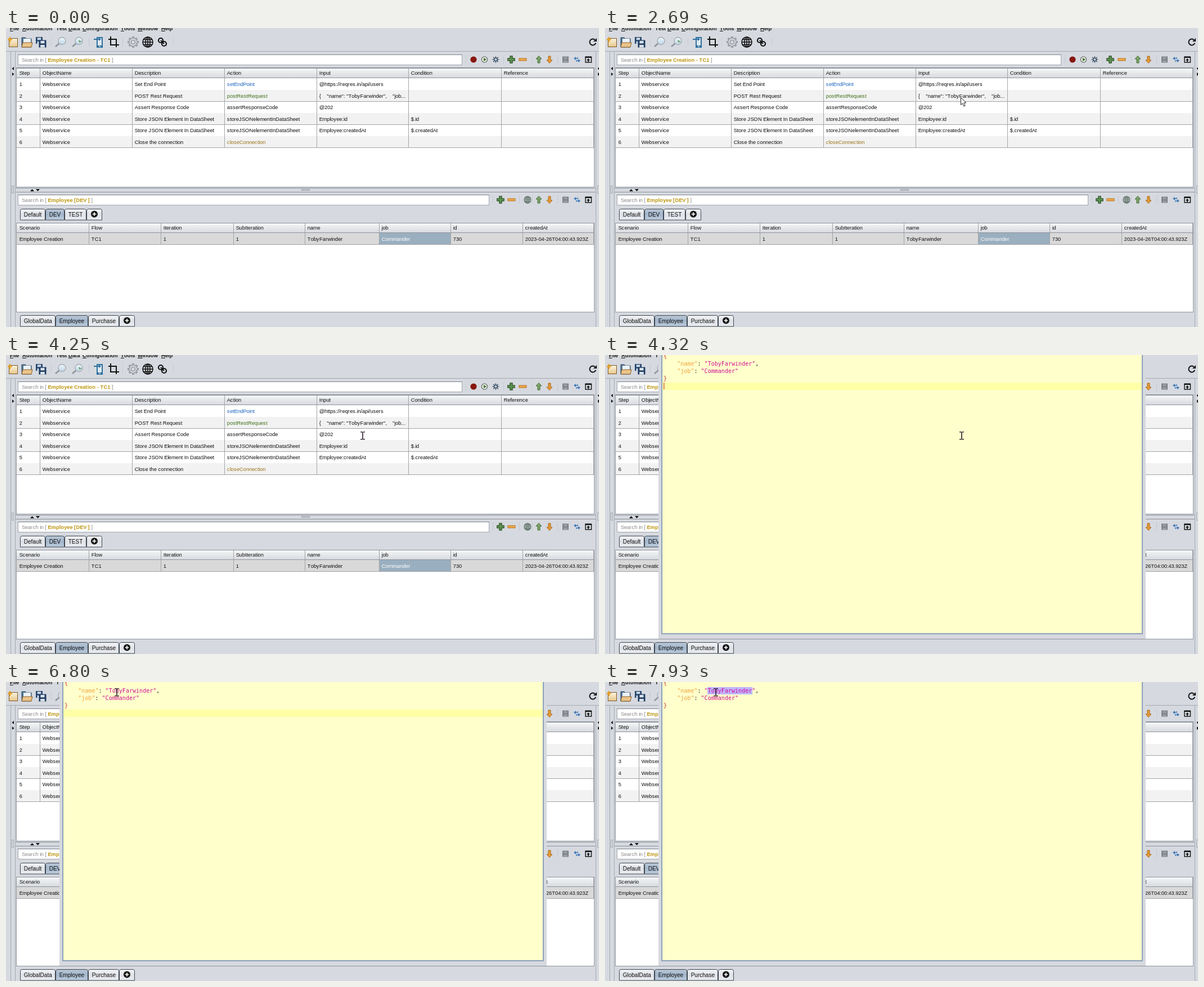
Recreate the animation shown at these times as an HTML page with a canvas. Size 1054 by 531 pixels, loop 8000 ms.

```html
<!DOCTYPE html>
<html lang="en">
<head>
<meta charset="utf-8">
<title>Test automation workspace</title>
<style>
html, body { margin: 0; width: 100%; height: 100%; overflow: hidden; background: #d6d9df; }
canvas { display: block; }
</style>
</head>
<body>
<canvas id="stage" width="1054" height="531"></canvas>
<script>
const g = document.getElementById('stage').getContext('2d');
const SANS = '"Liberation Sans", Arial, sans-serif';
const BODY = `9.3px ${SANS}`, BOLD = `bold 9.3px ${SANS}`, TAB = `10px ${SANS}`;
const MONO = '10.05px "DejaVu Sans Mono", monospace';
const LOOP = 8000, STEP = 67.3, ZOOM = .846;
const PANEL = '#d6d9df', GRID = '#a2a4a8', EDGE = '#8f949c', RIM = '#a4a9b2', GREEN = '#3f7032', ORANGE = '#e59a35';
const PERSON = 'TobyFarwinder';

// ---- drawing helpers ----
function rect(x, y, w, h, fill) { g.fillStyle = fill; g.fillRect(x, y, w, h); }
function frame(x, y, w, h, color) {
  g.strokeStyle = color; g.lineWidth = 1; g.strokeRect(x + .5, y + .5, w - 1, h - 1);
}
function fade(y, h, ...colors) {
  const f = g.createLinearGradient(0, y, 0, y + h);
  colors.forEach((c, i) => f.addColorStop(i / (colors.length - 1), c));
  return f;
}
// Small UI type sits on whole pixels of an 11px grid, shown at ZOOM
const advances = {};
function advance(ch, font) {
  const key = ch + font;
  if (!(key in advances)) {
    g.font = font.replace('9.3px', '111px');
    advances[key] = Math.round(g.measureText(ch).width / 10) * ZOOM;
  }
  return advances[key];
}
function width(s, font) { return [...s].reduce((sum, ch) => sum + advance(ch, font), 0); }
// y is the middle of the capitals; returns the x after the text
function text(s, x, y, color = '#111', font = BODY) {
  s = String(s);
  for (const ch of s) {
    const w = advance(ch, font);
    g.font = font; g.fillStyle = color;
    g.fillText(ch, x, y + 3.3);
    x += w;
  }
  return x;
}
function plainText(s, x, baseline, color, font) {
  g.font = font; g.fillStyle = color;
  g.fillText(s, x, baseline);
  return x + g.measureText(s).width;
}
function poly(points, fill, stroke, weight = 1) {
  g.beginPath();
  points.forEach(([x, y]) => g.lineTo(x, y));
  g.closePath();
  if (fill) { g.fillStyle = fill; g.fill(); }
  if (stroke) { g.strokeStyle = stroke; g.lineWidth = weight; g.stroke(); }
}
function line(points, color, weight = 1) {
  g.beginPath();
  points.forEach(([x, y]) => g.lineTo(x, y));
  g.strokeStyle = color; g.lineWidth = weight; g.stroke();
}
function disc(x, y, r, fill) { g.beginPath(); g.arc(x, y, r, 0, 7); g.fillStyle = fill; g.fill(); }
function ring(x, y, r, color, weight, from = 0, to = 2 * Math.PI) {
  g.beginPath(); g.arc(x, y, r, from, to); g.strokeStyle = color; g.lineWidth = weight; g.stroke();
}
function spokes(x, y, n, r0, r1, color, weight) {
  for (let i = 0; i < n; i++) {
    const a = i * 2 * Math.PI / n, c = Math.cos(a), s = Math.sin(a);
    line([[x + c * r0, y + s * r0], [x + c * r1, y + s * r1]], color, weight);
  }
}

// ---- icons, all given by their centre ----
function floppy(x, y, s, color, label) {
  rect(x - s, y - s, 2 * s, 2 * s, color);
  rect(x - s * .55, y - s * .8, s * 1.1, s * .7, label);
  rect(x - s * .6, y + s * .3, s * 1.2, s * .7, label);
}
function globe(x, y, r, color, weight) {
  ring(x, y, r, color, weight);
  g.beginPath(); g.ellipse(x, y, r * .45, r, 0, 0, 7); g.stroke();
  for (const d of [-.5, 0, .5]) {
    const w = r * Math.sqrt(1 - d * d);
    line([[x - w, y + d * r], [x + w, y + d * r]], color, weight);
  }
  line([[x, y - r], [x, y + r]], color, weight);
}
function plus(x, y) {
  for (const [r, w, color] of [[6.8, 5.4, '#27481f'], [5.8, 3.2, '#5b9150']]) {
    line([[x - r, y], [x + r, y]], color, w); line([[x, y - r], [x, y + r]], color, w);
  }
}
function minus(x, y) { rect(x - 7, y - 2.5, 14, 5, '#b8701c'); rect(x - 6, y - 1.5, 12, 3, '#f0aa4a'); }
function arrow(x, y, d, fill, edge) {
  poly([[0, -6.5], [5, -1], [2, -1], [2, 6], [-2, 6], [-2, -1], [-5, -1]].map(([a, b]) => [x + a, y + b * d]), fill, edge);
}
function swap(x, y) {
  const c = '#3f78b8';
  poly([[x - 6, y - 2], [x - 2, y - 5], [x - 2, y + 1]], c);
  poly([[x + 6, y + 2], [x + 2, y - 1], [x + 2, y + 5]], c);
  line([[x - 2, y - 2], [x + 1, y - 2], [x + 1, y - 4]], c, 1.4);
  line([[x + 2, y + 2], [x - 1, y + 2], [x - 1, y + 4]], c, 1.4);
}
function popOut(x, y) {
  g.strokeStyle = '#111'; g.lineWidth = 1.4; g.strokeRect(x - 5, y - 4.5, 10.5, 9.5);
  rect(x - 5.5, y - 5.5, 11, 2.5, '#111');
  poly([[x, y - 2], [x + 3, y + 1.5], [x - 3, y + 1.5]], '#111');
  rect(x - .8, y, 1.8, 4, '#111');
}
function lens(x, y, tint) {
  line([[x - 2, y + 2], [x - 9, y + 8]], '#8f959d', 2.6);
  disc(x + 2.5, y - 2, 6.5, fade(y - 9, 13, '#f3f8fb', '#bcd6e6')); ring(x + 2.5, y - 2, 6.5, '#a3a9b1', 1.3);
  if (tint) poly([[x + 2, y - 4], [x + 8, y - 1], [x + 3, y + 1]], tint);
}
function separators(y, ...xs) { for (const x of xs) for (let d = -7; d < 8; d += 3) rect(x, y + d, 1, 1, '#aab0b9'); }
function plusDisc(x, y) {
  disc(x, y, 6, '#111');
  line([[x - 3.3, y], [x + 3.3, y]], '#fff', 1.7); line([[x, y - 3.3], [x, y + 3.3]], '#fff', 1.7);
}

// ---- window parts ----
function menuAndTools() {
  [['File', 7], ['Automation', 29], ['Test Data', 89, 5], ['Configuration', 136], ['Tools', 204], ['Window', 234], ['Help', 276]]
    .forEach(([s, x, i = 0]) => {
      text(s, x, .8, '#111', BOLD);
      rect(x + width(s.slice(0, i), BOLD), 5, width(s[i], BOLD), 1, '#111');
    });
  separators(25, 80, 147, 207, 297);

  rect(5, 18, 16, 16, '#7d5a28'); rect(6, 19, 14, 14, fade(19, 14, '#fbf3df', '#e8c88c'));
  line([[3, 20.5], [11, 20.5]], '#e8a52c', 2.4); line([[7, 16], [7, 25]], '#e8a52c', 2.4);

  poly([[28, 34], [28, 17], [34, 17], [36, 19], [45, 19], [45, 34]], '#4f7594', '#2f4d63');
  rect(31, 19, 13, 8, '#edf3f7');
  poly([[28, 34], [30, 26], [47, 26], [45, 34]], '#ecc48a', '#8a6128');

  floppy(59, 22, 6, '#24456f', '#c9d6e2'); floppy(65, 28, 6.5, '#1d3a60', '#dbe4ec');
  lens(97, 25); lens(127, 25, '#76a874');

  rect(161, 16, 11, 19, '#2d6f9f'); rect(163, 18, 7, 13, '#dfe8ef');
  rect(165, 32, 3, 1.5, '#dfe8ef');
  line([[156, 20], [166, 20]], '#2d6f9f', 2); poly([[165, 17], [169, 20], [165, 23]], '#2d6f9f');

  line([[186, 15], [186, 30], [201, 30]], '#111', 2); line([[182, 20], [196, 20], [196, 34]], '#111', 2);

  spokes(226, 25, 8, 7, 9.8, '#85888c', 4);
  spokes(226, 25, 8, 6, 8.6, PANEL, 2);
  ring(226, 25, 7, '#85888c', 1.2); disc(226, 25, 6.4, PANEL); ring(226, 25, 3.5, '#85888c', 1.2);
  globe(252, 25, 9, '#111', 1.6);
  ring(275, 22, 4, '#111', 2.2); ring(281, 28, 4, '#111', 2.2); line([[275, 22], [281, 28]], '#111', 2);
  ring(1043, 25, 5.5, '#111', 1.9, .3, 5.5);
  poly([[1044, 24], [1050, 24], [1050, 18]], '#111');
}

function searchBar(y, w, label) {
  rect(21, y, w, 19, '#fff'); frame(21, y, w, 19, '#a4a8af');
  rect(21, y, w, 1, '#7f848c');
  let x = text('Search in [ ', 28, y + 10, '#8a8a8a');
  x = text(label, x, y + 10, '#bb960f', BOLD);
  text(' ]', x, y + 10, '#8a8a8a');
}

function sharedIcons(y) {
  separators(y, 935, 980);
  arrow(947, y, 1, '#7fa169', GREEN); arrow(966, y, -1, ORANGE, '#a9681b');
  floppy(994.5, y, 5.5, '#7f8388', '#9a9ea3'); swap(1015, y); popOut(1035, y);
}

function tabs(y, list) {
  for (const [label, x, w, active] of list) {
    g.beginPath(); g.roundRect(x + .5, y + .5, w - 1, 19.5, [3, 3, 0, 0]);
    g.fillStyle = active ? fade(y, 20, '#b9c7d6', '#a3b6cb', '#bccbdc') : fade(y, 20, '#f4f5f7', '#dfe2e7', '#eaecf0');
    g.fill(); g.strokeStyle = '#3d4650'; g.lineWidth = 1; g.stroke();
    if (label) plainText(label, x + 6.7, y + 14, '#111', TAB); else plusDisc(x + w / 2, y + 9.5);
  }
}

function header(y, h, cols, names, hover = -1) {
  rect(19, y, 1026, h, fade(y, h, '#f7f8f9', '#e6e8eb', '#d6d9de'));
  names.forEach((s, i) => {
    if (i === hover) rect(cols[i] + 1, y, cols[i + 1] - cols[i] - 1, h, fade(y, h, '#ffffff', '#f8f9fb', '#eaecf0'));
    text(s, cols[i] + 4.7, y + 9);
    rect(cols[i + 1], y, 1, h, GRID);
  });
  rect(19, y, 1026, 1, EDGE); rect(19, y + h - 1, 1026, 1, EDGE);
}

const COLS1 = [19, 60, 224, 388, 552, 715, 880, 1044];
const COLS2 = [19, 147, 275, 404, 531, 663, 790, 918, 1044];
const STEPS = [
  ['Set End Point', 'setEndPoint', '@https://reqres.in/api/users', '', '#1c64c0'],
  ['POST Rest Request', 'postRestRequest', `{    "name": "${PERSON}",    "job...`, '', '#3d7119'],
  ['Assert Response Code', 'assertResponseCode', '@202', ''],
  ['Store JSON Element In DataSheet', 'storeJSONelementInDataSheet', 'Employee:id', '$.id'],
  ['Store JSON Element In DataSheet', 'storeJSONelementInDataSheet', 'Employee:createdAt', '$.createdAt'],
  ['Close the connection', 'closeConnection', '', '', '#9b741b']
];

function stepTable(hover) {
  rect(18, 71, 1028, 211, '#fff'); frame(18, 70, 1028, 213, EDGE);
  header(71, 18, COLS1, ['Step', 'ObjectName', 'Description', 'Action', 'Input', 'Condition', 'Reference'], hover ? 4 : -1);
  STEPS.forEach(([what, action, input, check, color], i) => {
    const top = Math.round(89 + i * 20.55), bottom = Math.round(109.55 + i * 20.55);
    if (i % 2) rect(19, top, 1025, bottom - top, '#f2f2f2');
    [i + 1, 'Webservice', what, action, input, check].forEach((s, c) =>
      text(s, COLS1[c] + 4.8, top + 11, c === 3 && color || '#111'));
    rect(19, bottom, 1026, 1, GRID);
    COLS1.slice(1).forEach(x => rect(x, top, 1, bottom - top, GRID));
  });
}

function dataTable() {
  rect(18, 346, 1028, 158, '#fff'); frame(18, 346, 1028, 159, EDGE);
  header(346, 18, COLS2, ['Scenario', 'Flow', 'Iteration', 'SubIteration', 'name', 'job', 'id', 'createdAt']);
  rect(19, 364, 1025, 20, '#d9d9d9');
  rect(663, 364, 127, 20, '#9aafbf');
  ['Employee Creation', 'TC1', '1', '1', PERSON, 'Commander', '730', '2023-04-26T04:00:43.923Z'].forEach((s, i) => {
    text(s, COLS2[i] + 4.8, 375, i === 5 ? '#fff' : '#111');
    rect(COLS2[i + 1], 364, 1, 20, GRID);
  });
  rect(19, 384, 1026, 1, GRID);
}

function workspace(hover) {
  rect(0, 0, 1054, 531, PANEL);
  menuAndTools();
  rect(0, 41, 1054, 1, RIM);
  for (const x of [8, 16, 1048]) rect(x, 42, 1, 489, RIM);
  for (const x of [12, 1053]) {
    poly([[x + 2, 69], [x - 1.5, 72], [x + 2, 75]], '#111');
    poly([[x - 1, 79], [x + 2.5, 82], [x - 1, 85]], '#111');
  }
  frame(10, 280, 4, 14, RIM); frame(1051, 280, 4, 14, RIM);

  searchBar(47, 790, 'Employee Creation - TC1');
  separators(56, 817, 884);
  disc(831, 56, 5.6, '#86170f');
  disc(850.5, 56, 5.8, '#6f7a70'); disc(850.5, 56, 4.4, '#e8eee4');
  poly([[849, 53], [854, 56], [849, 59]], GREEN);
  spokes(870.5, 56, 8, 2, 6, '#34465a', 1.1); disc(870.5, 56, 3.6, '#34465a'); disc(870.5, 56, 2.2, '#b7c9da');
  plus(898, 56); minus(918.5, 56);
  sharedIcons(56);
  stepTable(hover);

  rect(17, 284, 1031, 1, EDGE); rect(17, 291, 1031, 1, EDGE);
  poly([[43, 290], [46.5, 286], [50, 290]], '#111'); poly([[53, 286], [60, 286], [56.5, 290]], '#111');
  frame(525, 286, 15, 3, '#989da6');

  searchBar(296, 838, 'Employee [DEV ]');
  separators(305, 865, 912);
  plus(879, 305); minus(898.5, 305); globe(927, 305, 6, '#56685f', 1.1);
  sharedIcons(305);
  tabs(321, [['Default', 25, 45], ['DEV', 70, 34, true], ['TEST', 104, 39], ['', 143, 28]]);
  dataTable();
  tabs(510, [['GlobalData', 25, 63], ['Employee', 88, 58, true], ['Purchase', 146, 55], ['', 201, 28]]);
}

function tooltip() {
  rect(552, 130, 157, 26, '#f7f7cf'); frame(552, 130, 157, 26, EDGE);
  text(`{ "name": "${PERSON}",`, 557, 138);
  text('"job": "Commander" }', 562, 148.5);
}

// ---- JSON editor ----
function code(parts, col, row) {
  let x = 104 + col * 6.05;
  for (const [s, color] of parts) x = plainText(s, x, 5.3 + row * 13.2, color, MONO);
}
function editor(t) {
  const KEY = '#f0a23c', VALUE = '#cf1094', BRACE = '#d4372f';
  const picked = t >= 7530, moved = t >= 7330;
  rect(95, 0, 866, 504, PANEL);
  rect(100, 0, 856, 496, '#8ca2bb'); rect(102, 0, 852, 494, '#ffffcc');
  if (!picked) rect(102, moved ? 9 : 49, 852, 13, '#ffffa6');
  if (picked) rect(182, 9, 80, 13, '#c0b6ff');
  code([['{', BRACE]], 0, 0);
  code([['"name"', KEY], [': ', '#222'], [`"${PERSON}"`, VALUE], [',', '#222']], 4, 1);
  code([['"job"', KEY], [': ', '#222'], ['"Commander"', VALUE]], 4, 2);
  code([['}', BRACE]], 0, 3);

  const blinks = [4770, 5330, 5870, 6340, 6800, 7200, 7930];
  if (blinks.filter(b => t >= b).length % 2 === 0) {
    const x = picked ? 261 : moved ? 195 : 104;
    rect(x, moved ? 9 : 49, 1.5, 12, '#e0664c');
  }
}

// ---- pointer ----
const PATH = [
  [673, 1005, 552], [940, 831, 451], [1200, 831, 451], [1720, 641, 88], [1800, 639, 65], [1880, 639, 65],
  [2020, 637, 88], [2160, 632, 123], [3500, 632, 123], [3750, 632, 141], [3910, 632, 136], [4225, 632, 136],
  [4226, 634, 143], [4700, 634, 143], [5100, 190, 36], [5450, 190, 36], [5800, 95, 7], [6210, 197, 18]
];
function pathAt(t) {
  const i = PATH.findIndex(k => k[0] > t);
  if (i < 0) return PATH[PATH.length - 1].slice(1);
  const [t0, x0, y0] = PATH[i - 1], [t1, x1, y1] = PATH[i], p = (t - t0) / (t1 - t0);
  return [Math.round(x0 + (x1 - x0) * p), Math.round(y0 + (y1 - y0) * p)];
}
function pointer(t) {
  if (t < 740) return;
  const [x, y] = pathAt(Math.floor((t + 20) / STEP) * STEP);
  if (t >= 4110 && t < 4250) {
    ring(632.5, 142, 8, '#3b9fd4', 3.5);
  } else if (t >= 4250 || y < 68) {
    rect(x - .8, y - 6, 1.6, 13, '#2b1c2b');
    for (const d of [-7, 6]) { rect(x - 4, y + d, 3.5, 1.4, '#2b1c2b'); rect(x + .5, y + d, 3.5, 1.4, '#2b1c2b'); }
  } else {
    poly([[0, 0], [0, 13], [3, 10.3], [5.3, 15.5], [7.6, 14.5], [5.3, 9.4], [9.5, 9.4]].map(([a, b]) => [x + a + .5, y + b + .5]), '#fff', '#222');
  }
}

function draw(now) {
  const t = now % LOOP;
  workspace(t >= 1740 && t < 2090);
  if (t >= 3100 && t < 3570) tooltip();
  if (t >= 4320) editor(t);
  pointer(t);
}
let start;
function tick(now) {
  start ??= now;
  draw(now - start);
  requestAnimationFrame(tick);
}
requestAnimationFrame(tick);
</script>
</body>
</html>
```
